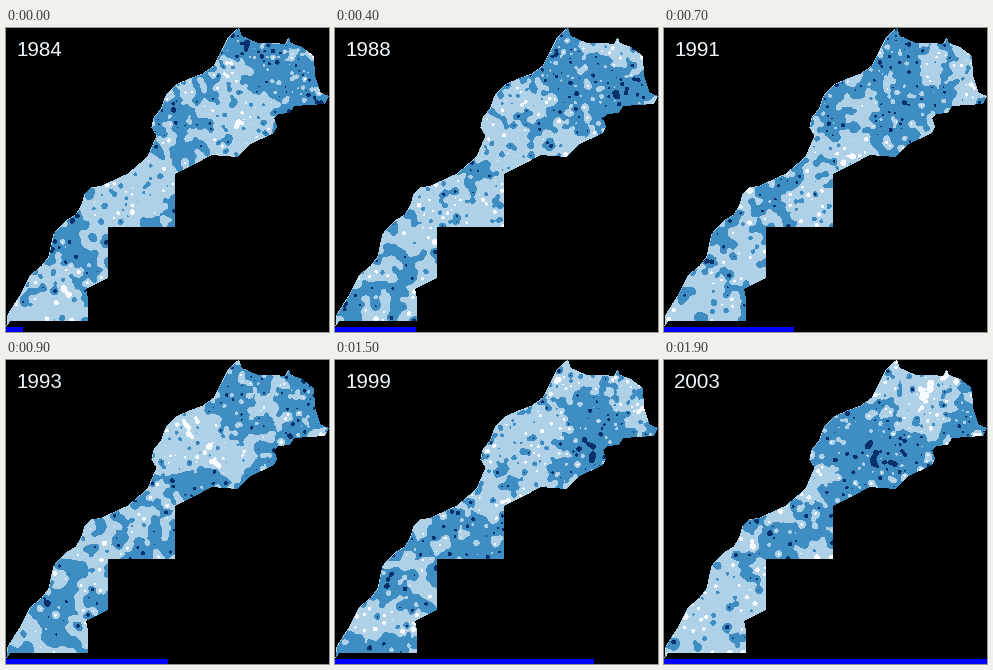
A matplotlib script for the animation above (2 s loop, 323x304 px).

```python
import math

import numpy as np
import matplotlib.pyplot as plt
from matplotlib.animation import FuncAnimation
from matplotlib.patches import Rectangle
from matplotlib.path import Path

W, H, DPI = 323, 304, 100
FIRST_YEAR, YEARS = 1984, 20
PALETTE = np.array([(247, 251, 255), (175, 209, 231), (62, 142, 196),
                    (8, 48, 107), (0, 0, 0)], dtype=np.uint8)
LIMITS = [-1.0, 0.0, 1.0]
PALE, BLACK = 1, 4

# Key points of the border, clockwise from the south-west corner.
BORDER = [(1, 298), (2, 287), (14, 268), (25, 247), (36, 238), (43, 229),
          (48, 206), (60, 193), (70, 187), (76, 177), (79, 166), (85, 160),
          (96, 158), (122, 146), (142, 129), (151, 108), (146, 100),
          (148, 90), (156, 80), (160, 68), (170, 57), (183, 51), (197, 46),
          (208, 38), (223, 9), (233, 0), (236, 8), (252, 15), (280, 16),
          (283, 10), (285, 15), (296, 19), (308, 28), (309, 48), (315, 65),
          (323, 68), (319, 76), (288, 78), (284, 85), (272, 86), (268, 90),
          (271, 99), (268, 105), (243, 117), (231, 129), (206, 127),
          (187, 137), (169, 146), (169, 199), (102, 199), (102, 250),
          (80, 261), (82, 270), (82, 293), (4, 293)]


def place_stations(border):
    """Scatter stations over the country, closer together in the north."""
    trials = np.random.default_rng(7).uniform((0, 0), (W, H), (9000, 2))
    found = np.empty((0, 2))
    for p in trials[border.contains_points(trials)]:
        gap = 3.6 + 2.6 * p[1] / H
        if not len(found) or np.hypot(*(found - p).T).min() > gap:
            found = np.vstack([found, p])
    return found


def station_values(year):
    """Random readings plus a few wet and dry regions, balanced around zero."""
    rng = np.random.default_rng(year)
    values = rng.normal(0, 1, len(stations))
    for centre in stations[rng.choice(len(stations), 12, replace=False)]:
        radius = rng.uniform(12, 24)
        d2 = ((stations - centre) ** 2).sum(axis=1)
        values += rng.choice([-0.5, 0.5]) * np.exp(-d2 / (2 * radius ** 2))
    return values - values.mean()


def year_map(year):
    """Inverse-distance interpolation cut into four classes."""
    field = weights @ station_values(year).astype(np.float32)
    classes = np.where(rim, PALE, BLACK)
    classes[inside] = np.digitize(field, LIMITS)
    return PALETTE[classes.reshape(H, W)]


border = Path(BORDER)
stations = place_stations(border)
gy, gx = np.mgrid[0:H, 0:W] + 0.5
pixels = np.column_stack([gx.ravel(), gy.ravel()])
inside = border.contains_points(pixels)
rim = border.contains_points(pixels + (0.6, 0.3))
land = pixels[inside].astype(np.float32)
sx, sy = stations.T.astype(np.float32)
weights = 1 / ((land[:, :1] - sx) ** 2 + (land[:, 1:] - sy) ** 2 + 0.1)
weights /= weights.sum(axis=1, keepdims=True)

fig = plt.figure(figsize=(W / DPI, H / DPI), dpi=DPI, facecolor="black")
ax = fig.add_axes([0, 0, 1, 1])
ax.axis("off")
picture = ax.imshow(year_map(FIRST_YEAR), extent=(0, W, H, 0),
                    interpolation="nearest", aspect="auto")
ax.set(xlim=(0, W), ylim=(H, 0))
label = ax.text(10, 28, "", color="aliceblue", family="Liberation Sans",
                fontsize=20.5 * 72 / DPI, ha="left", va="baseline")
bar = ax.add_patch(Rectangle((0, 299), 0, 5, color="#0000ff", lw=0,
                             antialiased=False))


def draw(i):
    year = FIRST_YEAR + i
    picture.set_data(year_map(year))
    label.set_text(str(year))
    bar.set_width(math.ceil(W * (i + 1) / YEARS))
    return picture, label, bar


anim = FuncAnimation(fig, draw, frames=YEARS, interval=100, repeat=True,
                     repeat_delay=0, blit=False)
plt.show()
```
